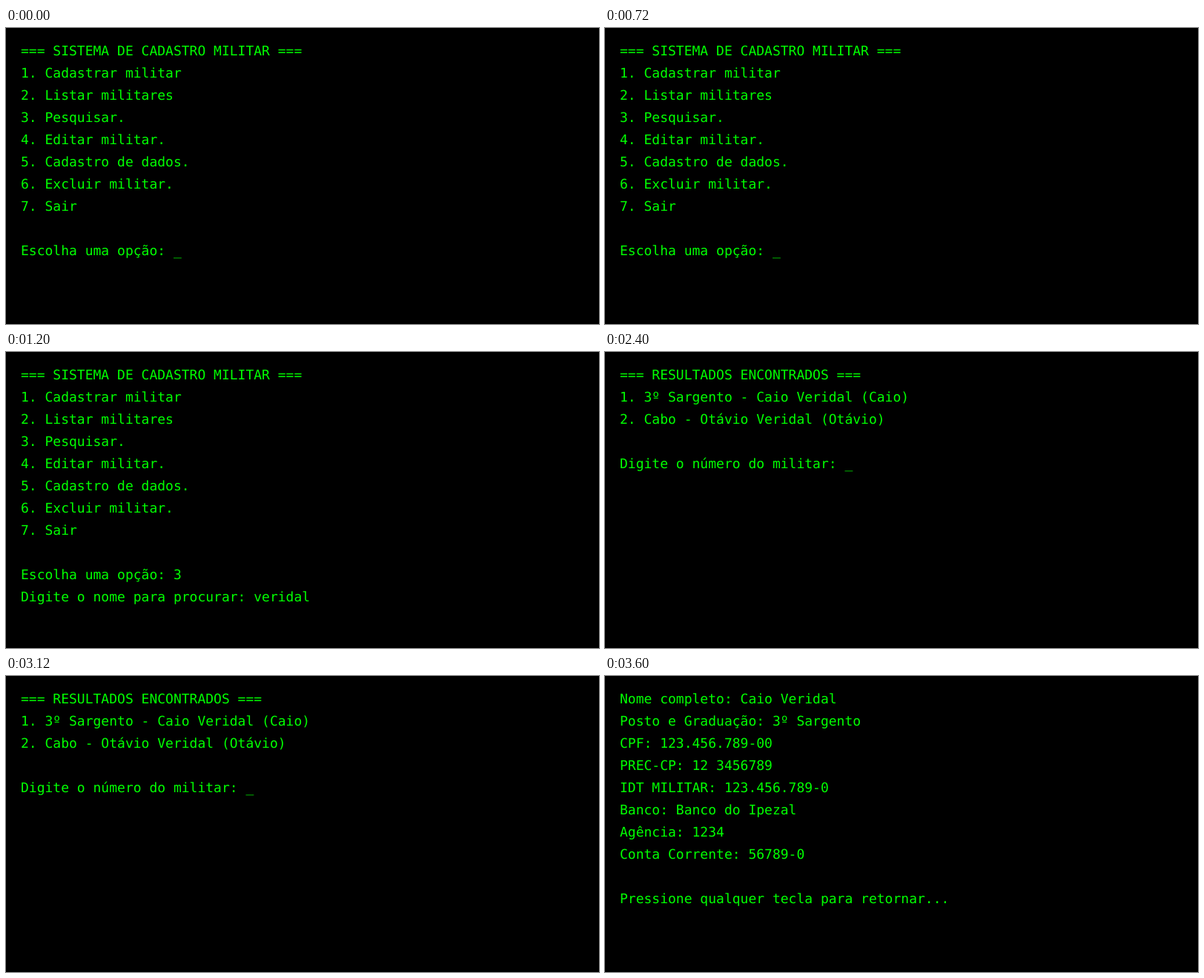
Recreate the animation shown at these times as an HTML page with a canvas. Size 800x400 px, loop 4800 ms.

```html
<!DOCTYPE html>
<html lang="pt-BR">
<head>
<meta charset="utf-8">
<title>Cadastro militar</title>
<style>
  html, body { margin: 0; width: 100%; height: 100%; overflow: hidden; background: #000; }
  canvas { display: block; }
</style>
</head>
<body>
<canvas id="screen" width="800" height="400"></canvas>
<script>
const ctx = document.getElementById('screen').getContext('2d');
const HOLD = 1200, LEFT = 20, BASELINE = 37, LINE = 30;

const menu = [
  '=== SISTEMA DE CADASTRO MILITAR ===',
  '1. Cadastrar militar',
  '2. Listar militares',
  '3. Pesquisar.',
  '4. Editar militar.',
  '5. Cadastro de dados.',
  '6. Excluir militar.',
  '7. Sair',
  ''
];

const screens = [
  [...menu, 'Escolha uma opção: _'],
  [...menu, 'Escolha uma opção: 3', 'Digite o nome para procurar: veridal'],
  [
    '=== RESULTADOS ENCONTRADOS ===',
    '1. 3º Sargento - Caio Veridal (Caio)',
    '2. Cabo - Otávio Veridal (Otávio)',
    '',
    'Digite o número do militar: _'
  ],
  [
    'Nome completo: Caio Veridal',
    'Posto e Graduação: 3º Sargento',
    'CPF: 123.456.789-00',
    'PREC-CP: 12 3456789',
    'IDT MILITAR: 123.456.789-0',
    'Banco: Banco do Ipezal',
    'Agência: 1234',
    'Conta Corrente: 56789-0',
    '',
    'Pressione qualquer tecla para retornar...'
  ]
];

function draw(lines) {
  ctx.fillStyle = '#000';
  ctx.fillRect(0, 0, 800, 400);
  ctx.font = '18px "DejaVu Sans Mono", monospace';
  ctx.textRendering = 'geometricPrecision';
  ctx.fillStyle = '#0f0';
  lines.forEach((text, row) => ctx.fillText(text, LEFT, BASELINE + row * LINE));
}

const start = performance.now();

function tick() {
  const elapsed = Math.max(0, performance.now() - start);
  draw(screens[Math.floor(elapsed / HOLD) % screens.length]);
  requestAnimationFrame(tick);
}
tick();
</script>
</body>
</html>
```
